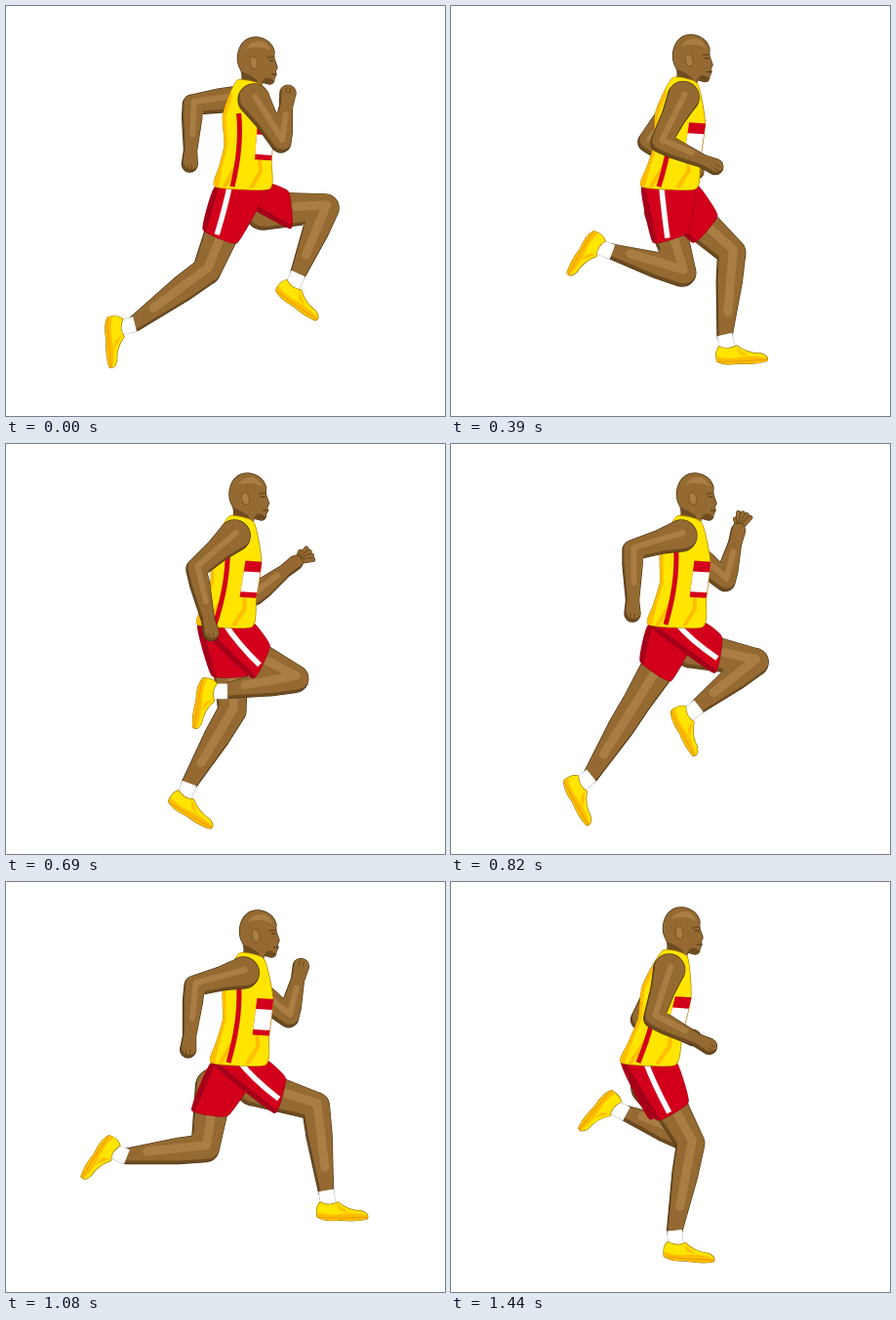
Recreate the animation shown at these times as an HTML page with a canvas. Size 450 by 420 pixels, loop 1.57 s.

```html
<!DOCTYPE html>
<html lang="en">
<head>
<meta charset="utf-8">
<title>Runner</title>
<style>
html, body { margin: 0; width: 100%; height: 100%; overflow: hidden; background: #fff; }
canvas { display: block; }
</style>
</head>
<body>
<canvas id="stage" width="450" height="420"></canvas>
<script>
const ctx = document.getElementById('stage').getContext('2d');
const LOOP = 1570, WAIST_Y = 185, HIP_Y = 210;
const STARTS = [0, 130, 260, 390, 560, 690, 820, 950, 1080, 1210, 1310, 1440];
const SKIN = { base: '#946a32', light: '#a97d43', dark: '#6e4b20', line: '#493211' };
const YELLOW = '#ffe500', AMBER = '#ffbd00', RED = '#d3001b', DARK_RED = '#a50019';

// Key poses by step. body: neck x, neck y, waist x, hip x.
// Feet: ankle x, y and pitch in degrees. Hands: wrist x, y.
const key = (body, nearFoot, farFoot, nearHand, farHand) =>
  ({ body, nearFoot, farFoot, nearHand, farHand });
const keys = {
  0: key([250, 78, 242, 255], [131, 326, 86], [299, 275, 35], [287, 103], [189, 148]),
  2: key([241, 75, 228, 227], [130, 266, 105], [329, 318, -5], [288, 118], [197, 166]),
  4: key([239, 76, 218, 235], [199, 237, 136], [232, 357, 0], [228, 200], [281, 158]),
  6: key([244, 76, 230, 245], [253, 269, 62], [143, 340, 61], [186, 160], [291, 102]),
  8: key([252, 75, 238, 236], [328, 317, 0], [123, 281, 122], [188, 158], [299, 100]),
  9: key([251, 75, 221, 219], [328, 335, -19], [154, 260, 144], [212, 174], [302, 142]),
  11: key([230, 72, 202, 210], [229, 358, 4], [179, 237, 129], [252, 162], [235, 155])
};

const mid = (a, b, t = 0.5) => a.map((v, i) => v + (b[i] - v) * t);
const add = ([x, y], dx, dy) => [x + dx, y + dy];
const blend = (a, b) => Object.fromEntries(Object.keys(a).map(k => [k, mid(a[k], b[k])]));

// Two-bone joint: side 1 bends forward (knee), -1 backward (elbow).
function joint(from, to, upper, lower, side) {
  const dx = to[0] - from[0], dy = to[1] - from[1], reach = Math.hypot(dx, dy);
  const stretch = Math.max(1, reach / (upper + lower));
  const u = upper * stretch, l = lower * stretch;
  const along = (u * u + reach * reach - l * l) / (2 * reach);
  const out = side * Math.sqrt(Math.max(0, u * u - along * along));
  return [from[0] + (dx * along + dy * out) / reach, from[1] + (dy * along - dx * out) / reach];
}

const distance = (a, b) => Math.hypot(b[0] - a[0], b[1] - a[1]);

// The pelvis turns with the foot; the shin foreshortens as the leg folds.
function solveLeg(hipX, [x, y, pitch], scale) {
  const hip = [hipX + 0.2 * (x - hipX), HIP_Y], ankle = [x, y];
  const shin = 62 + 0.2 * distance(hip, ankle);
  return { hip, knee: joint(hip, ankle, 66 * scale, shin * scale, 1), ankle, pitch: pitch * Math.PI / 180 };
}

function solveArm(shoulder, wrist, scale) {
  const forearm = 28 + 0.28 * distance(shoulder, wrist);
  const elbow = joint(shoulder, wrist, 52 * scale, forearm * scale, -1);
  return { shoulder, elbow, wrist, angle: Math.atan2(wrist[1] - elbow[1], wrist[0] - elbow[0]) };
}

function solve({ body, nearFoot, farFoot, nearHand, farHand }, step) {
  const [neckX, neckY, waistX, hipX] = body;
  const neck = [neckX, neckY], lean = waistX - neckX;
  const near = nearHand[0] - neckX, far = farHand[0] - neckX;
  return {
    neck, waist: [waistX, WAIST_Y],
    nearLeg: solveLeg(hipX, nearFoot, 1),
    farLeg: solveLeg(hipX, farFoot, 0.96),
    nearArm: solveArm(add(neck, 0.45 * lean + 0.1 * near + 4, 18), nearHand, 1),
    farArm: solveArm(add(neck, 0.4 * lean + 0.1 * far, 25 + 0.15 * far), farHand, 0.96),
    openHand: step > 3 && step < 8
  };
}

const poses = STARTS.map((_, i) => solve(keys[i] || blend(keys[i - 1], keys[i + 1]), i));

function spline(pts, tension) {
  const path = new Path2D(), n = pts.length, at = i => pts[(i + n) % n];
  path.moveTo(...pts[0]);
  for (let i = 0; i < n; i++) {
    const [a, b, c, d] = [at(i - 1), at(i), at(i + 1), at(i + 2)];
    path.bezierCurveTo(b[0] + (c[0] - a[0]) * tension, b[1] + (c[1] - a[1]) * tension,
      c[0] - (d[0] - b[0]) * tension, c[1] - (d[1] - b[1]) * tension, ...c);
  }
  path.closePath();
  return path;
}

// Outline of a row of circles joined by tapered bars.
function tube(pts, radii) {
  const path = new Path2D();
  pts.forEach(([x, y], i) => {
    path.moveTo(x + radii[i], y);
    path.arc(x, y, radii[i], 0, 7);
    if (!i) return;
    const [px, py] = pts[i - 1], len = Math.hypot(x - px, y - py) || 1;
    const nx = (y - py) / len, ny = (px - x) / len, r = radii[i - 1], s = radii[i];
    path.moveTo(px + nx * r, py + ny * r);
    path.lineTo(x + nx * s, y + ny * s);
    path.lineTo(x - nx * s, y - ny * s);
    path.lineTo(px - nx * r, py - ny * r);
    path.closePath();
  });
  return path;
}

function line(pts, color, width, cap = 'round') {
  ctx.beginPath();
  pts.forEach(p => ctx.lineTo(...p));
  Object.assign(ctx, { strokeStyle: color, lineWidth: width, lineCap: cap, lineJoin: 'round' });
  ctx.stroke();
}

function curve([a, b, c], color, width) {
  ctx.beginPath();
  ctx.moveTo(...a);
  ctx.quadraticCurveTo(...b, ...c);
  Object.assign(ctx, { strokeStyle: color, lineWidth: width, lineCap: 'butt' });
  ctx.stroke();
}

function shape(path, fill, outline, details) {
  ctx.save();
  Object.assign(ctx, { strokeStyle: outline, fillStyle: fill, lineWidth: 1.4, lineJoin: 'round' });
  ctx.stroke(path);
  ctx.fill(path);
  if (details) {
    ctx.clip(path);
    details();
  }
  ctx.restore();
}

function flesh(path, shine, width) {
  shape(path, SKIN.dark, SKIN.line, () => {
    ctx.translate(1.5, -3);
    ctx.fillStyle = SKIN.base;
    ctx.fill(path);
    line(shine, SKIN.light, width);
  });
}

// Drawn from the heel, with the ankle above it.
function drawShoe(ankle, pitch) {
  ctx.save();
  ctx.translate(...ankle);
  ctx.rotate(pitch);
  ctx.translate(-10, 29);
  const sock = [[10, -30], [13, -13]];
  line(sock, '#bbb', 16, 'butt');
  line(sock, '#fff', 15, 'butt');
  const shoe = new Path2D('M1-3Q-1-13 4-18Q13-13 22-18Q33-9 46-9Q55-6 52-1Q40 2 25 0Q8 2 1-3Z');
  shape(shoe, YELLOW, '#a87700', () => {
    ctx.fillStyle = AMBER;
    ctx.fill(new Path2D('M0-8Q12-4 25-6T54-4V4H0ZM20-17L34-7L25-9Z'));
    line([[0, -2.5], [25, -2], [53, -2.5]], '#e59a00', 0.9);
  });
  ctx.restore();
}

function drawLeg({ hip, knee, ankle, pitch }) {
  flesh(tube([hip, knee, mid(knee, ankle, 0.35), ankle], [19, 14, 13, 7.5]),
    [mid(hip, knee, 0.5), knee, mid(knee, ankle, 0.75)], 9);
  drawShoe(ankle, pitch);
}

function drawArm({ shoulder, elbow, wrist, angle }, shoulderRadius, open) {
  const ahead = (p, r, a = angle) => add(p, r * Math.cos(a), r * Math.sin(a));
  const fist = ahead(wrist, 14);
  if (open) {
    for (let i = -2; i < 3; i++) {
      const tip = ahead(fist, i === -2 ? 12 : 18, angle + i * 0.25);
      line([fist, tip], SKIN.line, 5);
      line([fist, tip], SKIN.base, 4);
    }
  }
  const biceps = mid(shoulder, elbow, 0.45), forearm = mid(elbow, wrist, 0.3);
  flesh(tube([shoulder, biceps, elbow, forearm, wrist, fist],
    [shoulderRadius, 12, 10, 10, 6.5, open ? 7 : 8]),
    [shoulder, biceps, elbow, mid(elbow, wrist, 0.7)], 6);
  if (!open) {
    for (const side of [-2, 2]) {
      const knuckle = ahead(fist, side, angle + Math.PI / 2);
      line([knuckle, ahead(knuckle, 5)], SKIN.dark, 1);
    }
  }
}

function drawHead([x, y]) {
  ctx.save();
  ctx.translate(x - 250, y - 78);
  const head = new Path2D('M240 84Q244 72 241 66Q236 58 238 48Q242 32 257 32Q272 34 275 47' +
    'Q274 53 276 57L278 63L276 67L277 70L275 74Q275 80 270 80L263 78Q260 82 263 90Z');
  shape(head, SKIN.base, SKIN.line, () => {
    ctx.fillStyle = SKIN.dark;
    ctx.fill(new Path2D('M241 67Q252 71 257 76L266 92H236ZM262 79Q266 70 274 76L276 84Z'));
    ctx.fillStyle = SKIN.light;
    ctx.fill(new Path2D('M246 44Q251 35 262 36Q270 39 271 46Q260 39 246 44Z'));
    line([[268, 53], [275, 52]], SKIN.dark, 1.5);
    line([[270, 56], [274, 56]], SKIN.line, 1);
    line([[272, 70], [277, 70]], SKIN.line, 1);
  });
  const ear = new Path2D();
  ear.ellipse(254, 58, 3.5, 6, -0.2, 0, 7);
  shape(ear, SKIN.light, SKIN.dark);
  ctx.restore();
}

// Each trouser leg spans the waist and a hem across the thigh.
function drawShorts({ waist, nearLeg, farLeg }) {
  for (const { hip, knee } of [farLeg, nearLeg]) {
    const hem = mid(hip, knee, 0.42), size = distance(hip, knee);
    const fx = (knee[1] - hip[1]) / size, fy = (hip[0] - knee[0]) / size;
    const across = r => add(hem, fx * r, fy * r);
    const pts = [add(waist, -27, 0), across(-19), across(18), add(waist, 27, -3)];
    shape(spline(pts, 0.06), RED, DARK_RED, () => {
      line([pts[0], pts[1]], DARK_RED, 7);
      if (knee !== nearLeg.knee) return;
      const top = add(waist, 0.2 * (hem[0] - waist[0]) - 8, -2), end = across(-4);
      curve([top, add(mid(top, end, 0.35), 0, 5), end], '#fff', 5.5);
    });
  }
}

function drawShirt({ neck, waist }) {
  // Down the spine from 0 to 1, then sideways in pixels.
  const at = (down, side) => add(mid(neck, waist, down), side, 0);
  const back = [at(-0.02, -12), at(0.13, -20), at(0.33, -25), at(0.6, -21), at(0.82, -25), at(1, -27)];
  const front = [at(1.02, 28), at(0.76, 28), at(0.4, 27), at(0.04, 13)];
  shape(spline([...back, ...front], 0.1), YELLOW, '#b98600', () => {
    line(back.slice(1), AMBER, 6);
    line([at(1, -18), at(0.8, -8)], AMBER, 4);
    line([at(1, 10), at(0.85, 18), at(0.7, 15)], AMBER, 4);
    curve([at(0.3, -9), at(0.62, -3), at(1, -10)], RED, 5);
  });
  const band = (top, bottom, color) => {
    const edge = [at(top, 11), at(top + 0.01, 28), at(bottom + 0.01, 28), at(bottom, 11)];
    ctx.fillStyle = color;
    ctx.beginPath();
    edge.forEach(p => ctx.lineTo(...p));
    ctx.fill();
  };
  band(0.4, 0.74, RED);
  band(0.5, 0.69, '#fff');
}

function drawRunner(pose) {
  ctx.fillStyle = '#fff';
  ctx.fillRect(0, 0, 450, 420);
  drawArm(pose.farArm, 12, pose.openHand);
  drawLeg(pose.farLeg);
  drawLeg(pose.nearLeg);
  drawShorts(pose);
  drawHead(pose.neck);
  drawShirt(pose);
  drawArm(pose.nearArm, 16, false);
}

function frame(now) {
  const t = now % LOOP;
  drawRunner(poses[STARTS.filter(s => s <= t).length - 1]);
  requestAnimationFrame(frame);
}
drawRunner(poses[0]);
requestAnimationFrame(frame);
</script>
</body>
</html>
```
